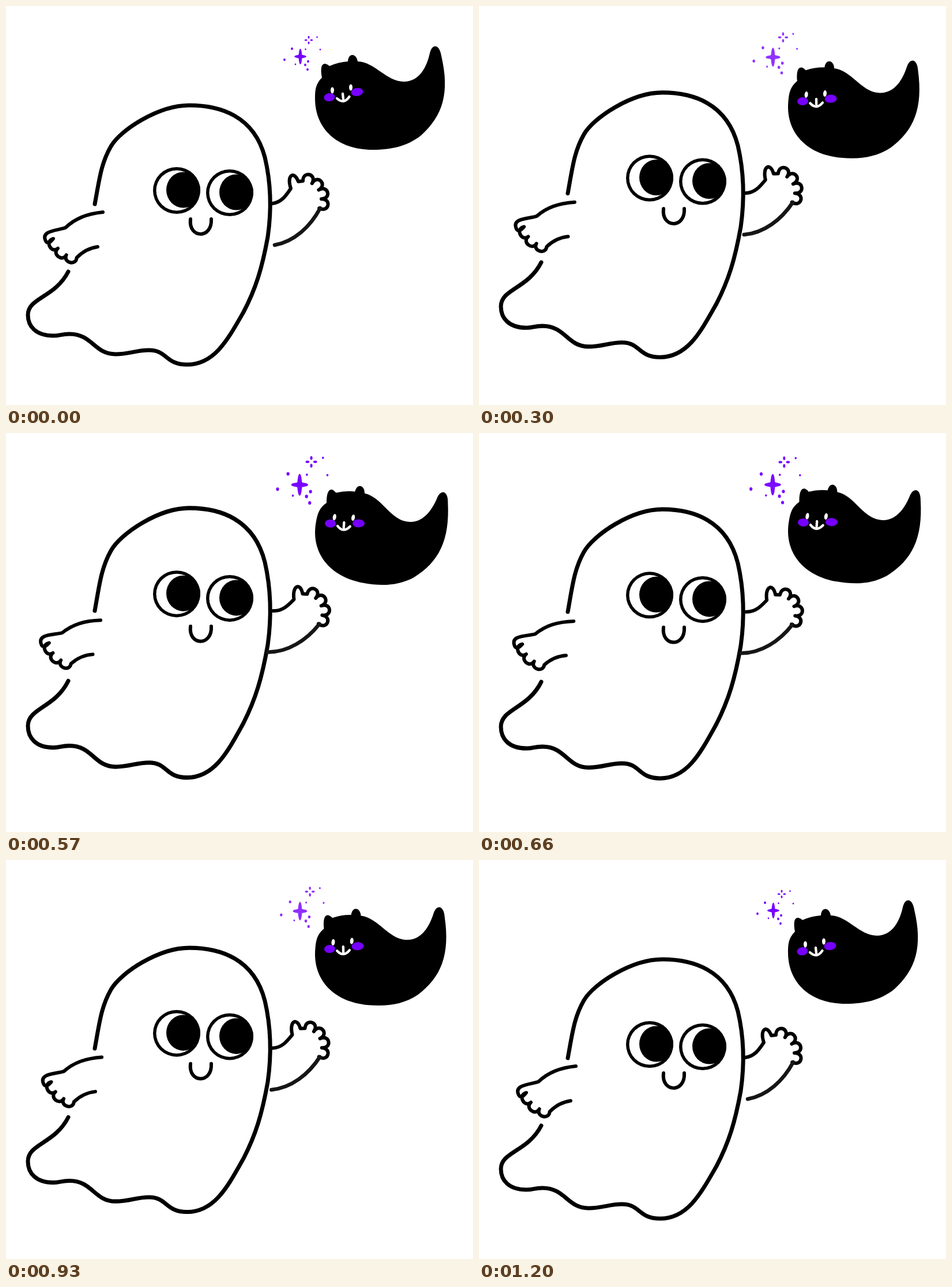
Write an HTML page with a canvas that moves like this. It is 810 px wide and 691 px high and loops after 1230 ms.

```html
<!DOCTYPE html>
<html lang="en">
<head>
<meta charset="utf-8">
<title>Ghost and cat</title>
<style>
html, body { margin: 0; width: 100%; height: 100%; overflow: hidden; background: #fff; }
canvas { display: block; }
</style>
</head>
<body>
<canvas id="stage" width="810" height="691"></canvas>
<script>
const ctx = document.getElementById('stage').getContext('2d');
const LOOP = 1230, STEP = 30, SWING = 1200;
const INK = '#000', PURPLE = '#7600ff', WHITE = '#fff';

const body = new Path2D(`M154 343 C162 300 165 272 182 243 S265 172 318 172 S430 190 449 262
  C458 300 462 345 454 400 C444 455 433 490 412 530 C385 577 362 621 314 621
  C276 621 280 596 248 596 C226 596 214 603 190 603 C153 603 150 568 110 568
  C95 568 95 571 82 571 C52 571 38 555 38 535 C38 505 85 505 108 460`);
const smile = new Path2D('M320 369 C316 403 358 404 356 369');

const backArm = new Path2D('M168 357 C140 360 120 368 103 384 C88 389 62 389 68 405 Q72 416 82 403');
addFingers(backArm, 125, 390, 46, 57, 163, 93, 3);
backArm.quadraticCurveTo(138, 420, 159, 417);

const waveArm = new Path2D('M462 342 C478 340 486 328 494 316 C486 292 500 285 507 304');
addFingers(waveArm, 515, 335, 32, 46, -90, 28, 4);
const waveUnder = new Path2D('M545 350 C528 382 500 408 466 414');

const cat = new Path2D(`M536 160 C536 145 537 135 548 124 C545 108 547 99 554 100 Q558 101 561 104
  Q577 97 593 96 C594 80 608 82 610 96 C640 97 660 131 690 131 C718 131 730 104 735 82
  C739 64 752 66 755 86 C770 150 758 190 720 224 C696 243 668 249 636 249 C575 249 536 213 536 160Z`);
const catSmile = new Path2D('M574 160 Q586 171 595.5 157 M584 152 L585 161');

// Rounded bumps along an arc; angles in degrees
function addFingers(path, cx, cy, palm, tip, from, to, count) {
  const reach = palm + (tip - palm) / 0.75;
  const polar = (i, r) => {
    const a = (from + (to - from) * i / count) * Math.PI / 180;
    return [cx + r * Math.cos(a), cy + r * Math.sin(a)];
  };
  path.lineTo(...polar(0, palm));
  for (let i = 0; i < count; i++) {
    path.bezierCurveTo(...polar(i, reach), ...polar(i + 1, reach), ...polar(i + 1, palm));
  }
}

function line(path, width, color = INK) {
  ctx.lineWidth = width;
  ctx.strokeStyle = color;
  ctx.stroke(path);
}

function oval(x, y, rx, ry, color, angle = 0) {
  ctx.beginPath();
  ctx.ellipse(x, y, rx, ry, angle, 0, 7);
  ctx.fillStyle = color;
  ctx.fill();
}

// Draw with a shift, a turn in radians and a scale around a pivot
function posed(px, py, dx, dy, turn, sx, sy, draw) {
  ctx.save();
  ctx.translate(px + dx, py + dy);
  ctx.rotate(turn);
  ctx.scale(sx, sy);
  ctx.translate(-px, -py);
  draw();
  ctx.restore();
}

function eye(x, y) {
  oval(x, y, 41, 40.5, INK);
  oval(x, y, 35.5, 35, WHITE);
  oval(x + 11.5, y - 1, 29.5, 31, INK);
}

function ghost(u) {
  posed(0, 172, 0, -44.2 * u, 0, 1, 1 + 0.0416 * u, () => line(body, 7));
  eye(296, 319.5 - 43 * u);
  eye(388, 323.5 - 39 * u);
  posed(0, 0, 0, -36 * u, 0, 1, 1, () => line(smile, 6));
  posed(168, 357, -4.2 * u, -34.5 * u, 0.08 * u, 1, 1, () => line(backArm, 6));
  posed(512, 345, 0, -26.5 * u, 0.19 * u, 1, 1, () => {
    line(waveArm, 6);
    line(waveUnder, 6.5, '#161616');
  });
}

function floatingCat(u, t) {
  const progress = Math.min(1, t / SWING) ** 0.63;
  const bob = 16 * Math.sin(Math.PI * progress) ** 2;
  posed(645, 165, -u, bob, 0.19 * u, 1, 1, () => {
    ctx.fillStyle = INK;
    ctx.fill(cat);
    oval(561, 158, 9.5, 7, PURPLE, -0.15);
    oval(609, 149, 10.5, 7, PURPLE, -0.15);
    oval(566, 146, 3, 5.5, WHITE);
    oval(598, 141, 3, 5.5, WHITE);
    line(catSmile, 4.3, WHITE);
  });
}

function sparkles(u) {
  const size = 1 + 0.415 * u;
  ctx.globalAlpha = 0.8 + 0.2 * Math.abs(2 * u - 1);
  posed(513.4, 82, 0, 0, 0, size, size, () => {
    const shape = new Path2D();
    const add = (x, y, rx, ry, angle = 0) => {
      const p = new Path2D();
      p.ellipse(x, y, rx, ry, angle, 0, 7);
      shape.addPath(p);
    };
    add(510.5, 87.5, 2.9, 13.5);
    add(510.5, 87.5, 10.5, 2.9);
    add(510.5, 87.5, 4.6, 4.6);
    for (let a = 0; a < 6; a += Math.PI / 2) {
      add(525 + 4.8 * Math.cos(a), 59 + 4.8 * Math.sin(a), 2.4, 1.5, a);
    }
    [[483, 93], [539.5, 54], [524, 96], [545, 75.5], [523, 110], [502, 101], [496, 74], [519.5, 75], [519, 102]]
      .forEach(([x, y], i) => add(x, y, i % 2 ? 1.3 : 1.9, i % 2 ? 1.4 : 2.2));
    ctx.fillStyle = PURPLE;
    ctx.fill(shape);
  });
  ctx.globalAlpha = 1;
}

function frame() {
  const t = Math.floor(performance.now() % LOOP / STEP) * STEP;
  const u = Math.max(0, 1 - Math.abs(2 * t / SWING - 1));
  ctx.fillStyle = WHITE;
  ctx.fillRect(0, 0, 810, 691);
  ctx.lineCap = ctx.lineJoin = 'round';
  ghost(u);
  floatingCat(u, t);
  sparkles(u);
  requestAnimationFrame(frame);
}
frame();
</script>
</body>
</html>
```
